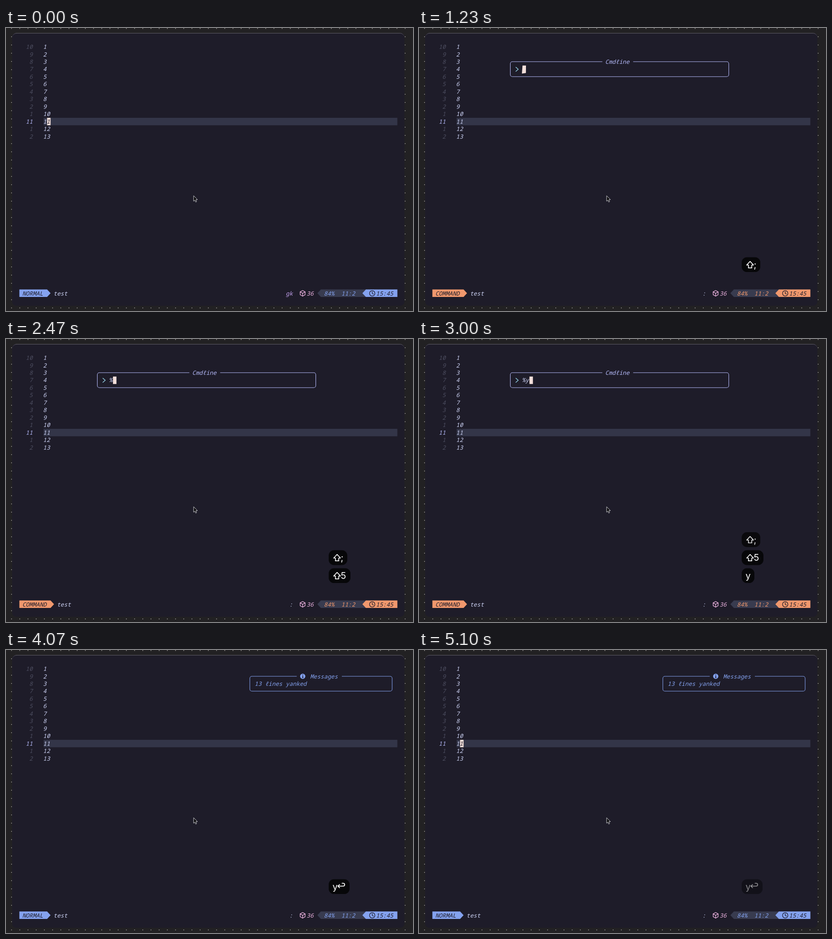
An HTML page with a canvas that plays this animation: 898x624 px, repeating every 5130 ms.

```html
<!DOCTYPE html>
<html lang="en">
<head>
<meta charset="utf-8">
<title>Editor demo</title>
<style>
html, body { margin: 0; width: 100%; height: 100%; overflow: hidden; background: #222123; }
canvas { display: block; width: 898px; height: 624px; }
</style>
</head>
<body>
<canvas id="stage"></canvas>
<script>
const W = 898, H = 624, LOOP = 5130;
const CELL = 7.65, ROW = 16.46, LEFT = 29.5, TOP = 41.6;
const MONO = 'italic 12.75px "Noto Sans Mono", "DejaVu Sans Mono", monospace';
const SANS = '20px Inter, Roboto, sans-serif';
const C = {
  desk: '#222123', bg: '#1e1c29', text: '#cdd3f5', dim: '#4d4e60', line: '#333548',
  lavender: '#b4b9f8', blue: '#84a2ef', orange: '#f0986d', gray: '#383b4f',
  pink: '#f0b5e3', mauve: '#c5a2f0', sky: '#94d3e6', cursor: '#f3dfda', dark: '#1e1c2a'
};

const canvas = document.getElementById('stage');
const dpr = window.devicePixelRatio || 1;
canvas.width = W * dpr;
canvas.height = H * dpr;
const ctx = canvas.getContext('2d');

// Key presses; at each one the cursor moves to cell (col, row).
const T = { colon: 1080, percent: 1850, yank: 2750, enter: 3110 };
const moves = [
  { at: -1200, col: 8, row: 10 },
  { at: T.colon, col: 26, row: 3 },
  { at: T.percent, col: 27, row: 3 },
  { at: T.yank, col: 28, row: 3 },
  { at: T.enter, col: 8, row: 10 }
];

const colX = c => LEFT + c * CELL;
const rowY = r => TOP + r * ROW;

// The slant leans right, so glyphs start slightly left of their cell.
function text(str, x, y, color) {
  ctx.font = MONO;
  ctx.fillStyle = color;
  ctx.fillText(str, x - 1.2, y + 4.5);
}

function poly(points, close = true) {
  ctx.beginPath();
  points.forEach(([x, y], i) => i ? ctx.lineTo(x, y) : ctx.moveTo(x, y));
  if (close) ctx.closePath();
}

function fillPoly(points, color) {
  poly(points);
  ctx.fillStyle = color;
  ctx.fill();
}

function pen(color, width) {
  ctx.strokeStyle = color;
  ctx.lineWidth = width;
  ctx.lineCap = ctx.lineJoin = 'round';
}

function drawDesk() {
  ctx.fillStyle = C.desk;
  ctx.fillRect(0, 0, W, H);
  ctx.fillStyle = '#cfccc8';
  for (let x = 12.3; x < W; x += 18.09) {
    for (let y = 1.2; y < H; y += 18.12) {
      ctx.fillRect(x - 0.7, y - 0.7, 1.4, 1.4);
    }
  }
  ctx.beginPath();
  ctx.roundRect(13.5, 11, 865.5, 601.5, 9);
  ctx.fillStyle = C.bg;
  ctx.fill();
  const rim = ctx.createLinearGradient(0, 11, 0, 20);
  rim.addColorStop(0, '#66646c');
  rim.addColorStop(1, 'rgba(70,68,78,0)');
  ctx.strokeStyle = rim;
  ctx.lineWidth = 1;
  ctx.beginPath();
  ctx.roundRect(14, 11.5, 864.5, 600.5, 9);
  ctx.stroke();
}

function drawBuffer() {
  ctx.fillStyle = C.line;
  ctx.fillRect(colX(7), 198, 863.5 - colX(7), 16.5);
  for (let i = 0; i < 13; i++) {
    const here = i === 10;
    const num = String(here ? 11 : Math.abs(i - 10)).padStart(2);
    text(num, colX(2), rowY(i), here ? C.lavender : C.dim);
    text(String(i + 1), colX(7), rowY(i), C.text);
  }
}

function drawCube(x, y) {
  const pts = [];
  for (let i = 0; i < 6; i++) {
    const a = (i / 6 - 0.25) * Math.PI * 2;
    pts.push([x + Math.cos(a) * 6.3, y + Math.sin(a) * 6.3]);
  }
  pen(C.pink, 1.3);
  poly(pts);
  ctx.stroke();
  for (const i of [1, 3, 5]) {
    poly([[x, y], pts[i]], false);
    ctx.stroke();
  }
}

function drawClock(x, y) {
  pen(C.dark, 1.3);
  ctx.beginPath();
  ctx.arc(x, y, 5.9, 0, Math.PI * 2);
  ctx.stroke();
  poly([[x, y - 3.6], [x, y], [x + 2.5, y + 1.6]], false);
  ctx.stroke();
}

function drawStatus(mode, showcmd) {
  const color = mode === 'NORMAL' ? C.blue : C.orange;
  const y = 585, top = 576.5, bottom = 593, right = 863.5;
  const end = 2 + mode.length;
  fillPoly([[LEFT, top], [colX(end), top], [colX(end + 1), y - 0.2],
    [colX(end), bottom], [LEFT, bottom]], color);
  text(mode, colX(1), y, C.dark);
  text('test', colX(end + 2), y, C.text);

  text(showcmd.padStart(2), colX(77), y, showcmd === ':' ? C.text : C.mauve);
  drawCube(654.5, y);
  text('36', colX(83), y, C.pink);
  const flag = (x, fill) => fillPoly(
    [[x, y - 0.2], [x + 7.7, top], [right, top], [right, bottom], [x + 7.7, bottom]], fill);
  flag(687, C.gray);
  flag(786.3, color);
  text('84%', colX(88), y, color);
  text('11:2', colX(93), y, color);
  drawClock(808, y);
  text('15:45', colX(103), y, C.dark);
}

function drawPanel(x, y, w, h, gapFrom, gapTo, color) {
  ctx.beginPath();
  ctx.roundRect(x, y, w, h, 4.5);
  ctx.fillStyle = C.bg;
  ctx.fill();
  pen(color, 1.1);
  ctx.stroke();
  ctx.fillStyle = C.bg;
  ctx.fillRect(gapFrom, y - 2, gapTo - gapFrom, 4);
}

function drawCmdline(typed) {
  drawPanel(201.5, 74.3, 482, 33, 404.5, 472.5, C.lavender);
  text('Cmdℓine', colX(50), rowY(2), C.lavender);
  pen(C.sky, 1.5);
  poly([[213.8, 86.5], [219, 91], [213.8, 95.5]], false);
  ctx.stroke();
  text(typed, colX(26), rowY(3), C.text);
}

function drawMessage() {
  drawPanel(538, 58, 314, 32.8, 641.5, 741, C.blue);
  ctx.beginPath();
  ctx.arc(654.7, 58, 5.8, 0, Math.PI * 2);
  ctx.fillStyle = C.blue;
  ctx.fill();
  ctx.fillStyle = C.dark;
  ctx.fillRect(653.9, 54.2, 1.7, 1.7);
  ctx.fillRect(653.9, 57, 1.7, 4.2);
  ctx.fillRect(653, 60.4, 3.5, 1);
  text('Messages', colX(84), rowY(1), C.blue);
  text('13 ℓines yanked', colX(68), rowY(2), C.blue);
}

const corners = m => {
  const x = colX(m.col), y = rowY(m.row) - 8.2;
  return [[x, y], [x + CELL, y], [x + CELL, y + ROW], [x, y + ROW]];
};

// Each corner springs to its place; those facing the motion get there first.
function cursorShape(t, prev, move) {
  const to = corners(move);
  if (!prev) return to;
  const from = corners(prev);
  const dx = to[0][0] - from[0][0], dy = to[0][1] - from[0][1];
  const len = Math.hypot(dx, dy);
  return to.map(([x, y], i) => {
    const ox = i === 1 || i === 2 ? 0.5 : -0.5;
    const oy = i > 1 ? 1 : -1;
    const lead = (ox * dx + oy * dy) / len;
    const s = (t - move.at) / (14.5 - 8 * lead);
    const rest = (1 + s) * Math.exp(-s);
    return [x - dx * rest, y - dy * rest];
  });
}

function drawCursor(t) {
  const i = moves.findLastIndex(m => t >= m.at);
  const move = moves[i];
  const age = t - move.at - 700;
  if (age >= 0 && age % 650 < 400) return;
  const shape = cursorShape(t, moves[i - 1], move);
  fillPoly(shape, C.cursor);
  if (move.row === 10) {
    ctx.save();
    poly(shape);
    ctx.clip();
    text('1', colX(8), rowY(10), C.dark);
    ctx.restore();
  }
}

function drawPointer() {
  fillPoly([[414, 370.2], [414, 382], [416.6, 379.6], [418.6, 383.8], [420.6, 382.9],
    [418.7, 378.8], [422, 378.5]], '#0b0b0d');
  pen('#e6e6ea', 0.9);
  ctx.stroke();
}

function shiftIcon(y) {
  pen('#fff', 1.7);
  poly([[730.5, y - 7], [738, y + 1], [734.2, y + 1], [734.2, y + 7.2],
    [726.8, y + 7.2], [726.8, y + 1], [723, y + 1]]);
  ctx.stroke();
}

function returnIcon(y) {
  pen('#fff', 1.8);
  ctx.beginPath();
  ctx.moveTo(733, y - 1);
  ctx.lineTo(744, y - 1);
  ctx.arc(744, y - 4.2, 3.2, Math.PI / 2, -Math.PI / 2, true);
  ctx.lineTo(741.5, y - 7.4);
  ctx.stroke();
  poly([[736, y - 4.5], [732.3, y - 1], [736, y + 2.5]], false);
  ctx.stroke();
}

const keys = [
  { at: T.colon, last: T.colon, label: ';', x: 738.5, width: 41, shift: true },
  { at: T.percent, last: T.percent, label: '5', x: 738.5, width: 48, shift: true },
  { at: T.yank, last: T.enter, label: 'y', x: 720.5, width: 46 }
];

function drawKeys(t) {
  let y = 521.7;
  for (const k of [...keys].reverse()) {
    if (t < k.at) continue;
    const last = t >= k.last ? k.last : k.at;
    const alpha = Math.min(1, 1 - (t - last - 1900) / 180);
    if (alpha > 0) {
      const entered = !k.shift && t >= T.enter;
      ctx.globalAlpha = alpha;
      ctx.beginPath();
      ctx.roundRect(712, y - 16.2, k.shift || entered ? k.width : 28, 32.6, 11.5);
      ctx.fillStyle = '#070709';
      ctx.fill();
      if (k.shift) shiftIcon(y);
      if (entered) returnIcon(y);
      ctx.font = SANS;
      ctx.fillStyle = '#fff';
      ctx.fillText(k.label, k.x, y + 7.4);
      ctx.globalAlpha = 1;
    }
    y -= 39.7;
  }
}

function draw(t) {
  ctx.setTransform(dpr, 0, 0, dpr, 0, 0);
  const command = t >= T.colon && t < T.enter;
  drawDesk();
  drawBuffer();
  drawStatus(command ? 'COMMAND' : 'NORMAL', t < T.colon ? 'gk' : ':');
  if (command) drawCmdline(t >= T.yank ? '%y' : t >= T.percent ? '%' : '');
  if (t >= T.enter) drawMessage();
  drawCursor(t);
  drawKeys(t);
  drawPointer();
}

function tick() {
  draw(performance.now() % LOOP);
  requestAnimationFrame(tick);
}
tick();
</script>
</body>
</html>
```
